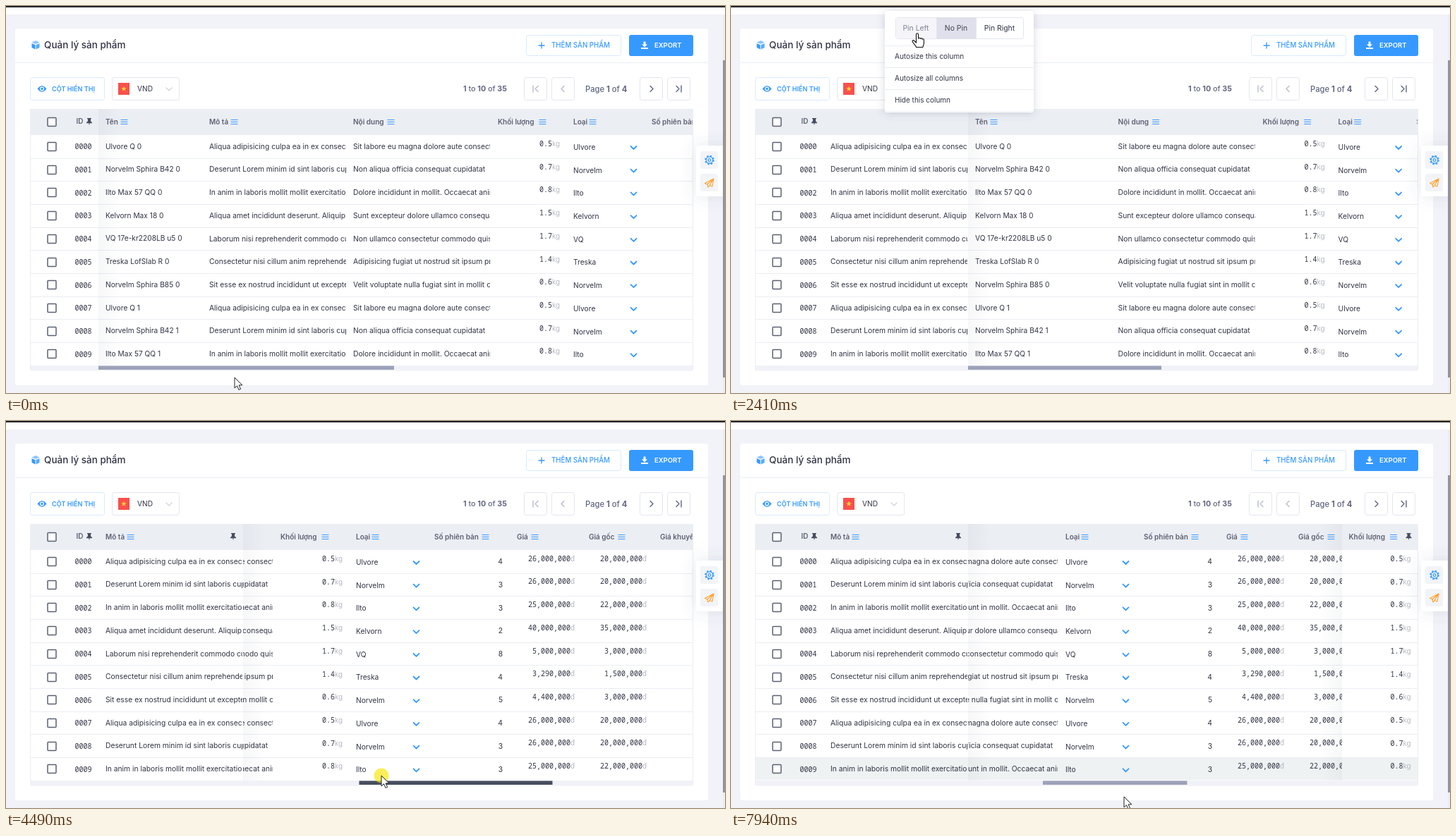
Animation of 1019x549 px, one loop 8000 ms. Source, as an HTML page:

```html
<!DOCTYPE html>
<html lang="vi">
<head>
<meta charset="utf-8">
<title>Quản lý sản phẩm</title>
<style>
html, body { margin: 0; width: 100%; height: 100%; overflow: hidden; background: #f2f3f8; }
svg { display: block; width: 100%; height: 100%; font-family: Inter, "Open Sans", sans-serif; }
text { fill: #303344; white-space: pre; }
.mono { font-family: "Noto Sans Mono", "DejaVu Sans Mono", monospace; font-size: 10px; }
.unit { fill: #a5a8b5; font-weight: 300; }
.line { fill: none; stroke-linecap: round; stroke-linejoin: round; }
</style>
</head>
<body>
<svg id="stage" viewBox="0 0 1019 549"></svg>
<script>
const LOOP = 8000, BLUE = '#3699ff', TOP = 199, PITCH = 32.7;
const stage = document.getElementById('stage');

// markup helpers
const text = (x, y, str, size = 10.3, attrs = '') =>
  `<text x="${x}" y="${y + size * .36}" font-size="${size}" ${attrs}>${str}</text>`;
const box = (x, y, w, h, fill = '#fff', attrs = '') =>
  `<rect x="${x}" y="${y}" width="${w}" height="${h}" fill="${fill}" ${attrs}/>`;
const line = (d, color, width = 1.4, attrs = '') =>
  `<path class="line" d="${d}" stroke="${color}" stroke-width="${width}" ${attrs}/>`;
const frame = (x, y, w, h, color = '#e4e6ef') =>
  box(x + .5, y + .5, w - 1, h - 1, '#fff', `rx="3" stroke="${color}"`);
const rows = fn => Array.from({ length: 10 }, (_, i) => fn(items[i % 7], TOP + PITCH * i, i)).join('');

// table data
const item = (brand, model, weight, versions, price, base, about, content) =>
  ({ brand, model, weight, versions, price, base, about, content });
const items = [
  item('Ulvore', 'Q', '0.5', 4, 26e6, 20e6,
    'Aliqua adipisicing culpa ea in ex consectetur', 'Sit labore eu magna dolore aute consectetur'),
  item('Norvelm', 'Sphira B42', '0.7', 3, 26e6, 20e6,
    'Deserunt Lorem minim id sint laboris cupidatat', 'Non aliqua officia consequat cupidatat'),
  item('Ilto', 'Max 57 QQ', '0.8', 3, 25e6, 22e6,
    'In anim in laboris mollit mollit exercitation', 'Dolore incididunt in mollit. Occaecat anim'),
  item('Kelvorn', 'Max 18', '1.5', 2, 40e6, 35e6,
    'Aliqua amet incididunt deserunt. Aliquip amet', 'Sunt excepteur dolore ullamco consequat'),
  item('VQ', '17e-kr2208LB u5', '1.7', 8, 5e6, 3e6,
    'Laborum nisi reprehenderit commodo culpa', 'Non ullamco consectetur commodo quis'),
  item('Treska', 'LofSlab R', '1.4', 4, 3.29e6, 1.5e6,
    'Consectetur nisi cillum anim reprehenderit', 'Adipisicing fugiat ut nostrud sit ipsum pro'),
  item('Norvelm', 'Sphira B85', '0.6', 5, 4.4e6, 3e6,
    'Sit esse ex nostrud incididunt ut excepteur', 'Velit voluptate nulla fugiat sint in mollit culpa')
];

const amount = (x, y, value, unit) =>
  `<text x="${x}" y="${y}" text-anchor="end"><tspan class="mono">${value}</tspan>` +
  `<tspan class="unit" font-size="10">${unit}</tspan></text>`;
const money = (x, key) => (r, y) => amount(x, y - .3, r[key].toLocaleString('en-US'), 'đ');
const chevron = (x, y, color, w = 1.8) => line(`M${x - 4} ${y - 2}l4 4 4-4`, color, w);
const pin = x => `<path d="M${x - 3} 159h6v1.2h-1v3l2 2v1h-3.3l-.7 3-.7-3h-3.3v-1l2-2v-3h-1z" fill="#464e5f"/>`;
const clipped = key => (r, y) => text(0, y, r[key], 10.3, 'clip-path="url(#cell)"');

// x of the label, label, offset of the menu icon, cell markup
const columns = {
  name: [141, 'Tên', 22, (r, y, i) => text(0, y, `${r.brand} ${r.model} ${i / 7 | 0}`, 10.2)],
  about: [288, 'Mô tả', 31, clipped('about')],
  content: [492, 'Nội dung', 49, clipped('content')],
  weight: [697, 'Khối lượng', 59, (r, y) => amount(88, y, r.weight, 'kg')],
  type: [804, 'Loại', 23, (r, y) => text(0, y + 1.3, r.brand, 10.2) + chevron(85.5, y + 2, BLUE)],
  versions: [915, 'Số phiên bản', 68, (r, y) => text(97, y + .5, r.versions, 10.3, 'text-anchor="end"')],
  price: [1032, 'Giá', 21, money(82, 'price')],
  base: [1134, 'Giá gốc', 42, money(82, 'base')],
  promo: [1235, 'Giá khuyến mãi', 82, () => '']
};
const column = ([id, [, label, icon, cell]]) => `<g id="${id}"><g class="head">
  ${text(0, 164, label, 10, 'font-weight="600" style="fill:#5d6173"')}
  ${line(`M${icon} 161.5h9m-9 3h9m-9 3h9`, BLUE, 1.2)}</g>${rows(cell)}</g>`;

const menu = (id, x, y, tip, units) => {
  const d = units ? 49 : 0, gy = y + (units ? 10 : 9), h = 144 + d;
  const label = (cx, cy, str, name = '') => text(cx, cy, str, 10.4, `text-anchor="middle" class="${name}"`);
  const rule = (x, y, h) => box(x, y, 1, h, '#e4e6ef');
  return `<g id="${id}"><g filter="url(#shadow)">${box(x, y, 211, h, '#fff', 'rx="3"')}
    <path d="M${tip} ${units ? y - 5 : y + h + 5}l-5 5h10z" fill="#fff"
      ${units ? '' : `transform="rotate(180 ${tip} ${y + h + 2.5})"`}/></g>
    ${frame(x + 15, gy, 182, 31)}
    ${box(x + 16, gy + 1, 57, 29, '#fff', 'class="left"')}${box(x + 73, gy, 56, 31, '#ebecf4', 'class="none"')}
    ${rule(x + 73, gy, 31)}${rule(x + 129, gy, 31)}
    ${label(x + 44, gy + 15.5, 'Pin Left', 'leftText')}${label(x + 101, gy + 15.5, 'No Pin', 'noneText')}
    ${label(x + 162.5, gy + 15.5, 'Pin Right')}
    ${units ? frame(x + 15, y + 59, 182, 31) + box(x + 15, y + 59, 92, 31, '#ebecf4') + rule(x + 107, y + 59, 31) +
      label(x + 61, y + 74.5, 'Kg', 'noneText') + label(x + 152, y + 74.5, 'Lb') : ''}
    ${['Autosize this column', 'Autosize all columns', 'Hide this column'].map((str, i) =>
      box(x, y + d + 49 + 31 * i, 211, 1, '#ebedf3') + text(x + 14, y + d + 64.5 + 31 * i, str, 10)).join('')}
    ${units ? '' : box(x, y + 142, 211, 1, '#f0f1f6')}</g>`;
};

const checkbox = y => box(59, Math.round(y) - 5.5, 12, 12, '#fff', 'rx="1" stroke="#5b6172" stroke-width="1.5"');
const pager = (x, d, color) => frame(x, 101, 33, 33) + line(d, color);
const bold = n => `<tspan font-weight="700">${n}</tspan>`;

stage.innerHTML = `
<defs>
  <clipPath id="cell"><rect y="140" width="194" height="400"/></clipPath>
  <clipPath id="mid"><rect id="midRect" y="146" height="364"/></clipPath>
  <linearGradient id="edge"><stop stop-color="#5a6478" stop-opacity=".05"/><stop offset="1" stop-color="#5a6478" stop-opacity="0"/></linearGradient>
  <filter id="shadow" x="-20%" y="-20%" width="140%" height="140%">
    <feDropShadow dx="0" dy="1" stdDeviation="6" flood-color="#525d79" flood-opacity=".25"/></filter>
  <filter id="soft" x="-100%" y="-60%" width="300%" height="220%">
    <feDropShadow dx="0" dy="0" stdDeviation="11" flood-color="#525d79" flood-opacity=".14"/></filter>
</defs>
${box(0, 0, 1019, 549, '#f2f3f8')}${box(0, 2, 1019, 10)}${box(0, 0, 1019, 2, '#222328')}
${box(13, 32, 982, 506, '#fff', 'rx="3"')}${box(13, 80, 982, 1, '#ebedf3')}
<path d="M36.5 51.5l5.5-2.500 5.500 2.500-5.500 2.500z" fill="#8cc4ff"/>
<path d="M36.500 53l5 2.300v6.200l-5-2.500z" fill="${BLUE}"/><path d="M47.500 53l-5 2.300v6.200l5-2.500z" fill="#59aaff"/>
${text(54, 55, 'Quản lý sản phẩm', 13.5, 'font-weight="500"')}
${frame(737, 41, 135, 30, '#d9eaff')}${line('M755 56h8m-4-4v8', BLUE, 1.3)}
${text(773, 56, 'THÊM SẢN PHẨM', 9.7, `font-weight="500" style="fill:${BLUE}"`)}
${box(883, 41, 91, 30, BLUE, 'rx="3"')}
<path d="M903.500 50.500h3v4h2.500l-4 4-4-4h2.500zM900 59h10v2h-10z" fill="#fff"/>
${text(919, 56, 'EXPORT', 9.5, 'font-weight="600" style="fill:#fff"')}
${frame(34, 101, 106, 33, '#d9eaff')}
<path d="M44.500 117.500q6.500-8.500 13 0q-6.500 8.500-13 0z" fill="${BLUE}"/><circle cx="51" cy="117.500" r="2.400" fill="${BLUE}" stroke="#fff" stroke-width="1.200"/>
${text(65, 117.5, 'CỘT HIỂN THỊ', 9.1, `font-weight="600" style="fill:${BLUE}"`)}
${frame(150, 101, 96, 33)}${box(159, 109, 16, 17, '#f9504b')}
<path d="M167 113.500l1 2.700h2.800l-2.200 1.700.8 2.800-2.400-1.700-2.400 1.700.8-2.800-2.200-1.700h2.800z" fill="#ffd23c"/>
${text(186, 117.5, 'VND', 10.2)}${chevron(231, 118, '#d1d3df', 1.2)}
${text(648, 117.5, `${bold(1)} to ${bold(10)} of ${bold(35)}`, 10.7, 'font-weight="500" style="fill:#5f6580"')}
${pager(734, 'M747 113v9m7-8.500l-4 4 4 4', '#b9bccb')}${pager(773, 'M791 113.500l-4 4 4 4', '#b9bccb')}
${text(821, 117.5, `Page ${bold(1)} of ${bold(4)}`, 11.2, 'font-weight="500" style="fill:#5f6580"')}
${pager(898, 'M913 113.500l4 4-4 4', '#5f6580')}${pager(937, 'M950 113.500l4 4-4 4m7-8.500v9', '#5f6580')}
${box(34.5, 146.5, 939, 370.5, '#fff', 'rx="2" stroke="#ebedf3"')}
${box(34, 146, 940, 37, '#ebeef3')}
<g id="hover">${box(35, 0, 938, 32, '#eff2f2')}</g>
${rows((r, y) => box(35, Math.round(y + 16.5), 938, 1, '#ebedf3'))}
${box(35, 510, 938, 6.5, '#f1f2f8')}
${checkbox(164)}${text(99.5, 163.5, 'ID', 10, 'font-weight="600" style="fill:#5d6173"')}${pin(118)}
${rows((r, y, i) => checkbox(y) + `<text class="mono" x="97.500" y="${y + 4.300}">000${i}</text>`)}
<circle id="glow" cy="164" r="8.500" fill="#cfe3f7"/>
<g id="pane" clip-path="url(#mid)">${Object.entries(columns).map(column).join('')}</g>
<g id="pinned"></g>
<g id="pinLeft">${pin(322)}</g><g id="pinRight">${pin(960.5)}</g>
<g id="edgeL">${box(0, 146, 32, 364, 'url(#edge)')}</g>
<g id="edgeR"><g transform="scale(-1 1)">${box(0, 146, 32, 364, 'url(#edge)')}</g></g>
<rect id="thumb" y="510.500" height="5.500"/>
<g filter="url(#soft)">${box(978, 198, 50, 72, '#fff', 'rx="3"')}</g>
${box(984, 206, 25, 25, '#f2f4f8', 'rx="3"')}${box(984, 238, 25, 25, '#f2f4f8', 'rx="3"')}
<circle cx="997" cy="218.500" r="5.800" fill="none" stroke="${BLUE}" stroke-width="2" stroke-dasharray="2.300 2.255"/>
<circle cx="997" cy="218.500" r="4.700" fill="#f2f4f8" stroke="${BLUE}" stroke-width="1.200"/><circle cx="997" cy="218.500" r="1.900" fill="none" stroke="${BLUE}" stroke-width="1.200"/>
${line('M1003 245l-12.500 6.500 3.500 1.500 1 4 2.200-2.600 3.800 1.600zm0 0l-9 8m9-8l-5.800 9.400', '#ffa12b', 1.1)}
${box(1016, 12, 3, 537, '#eceef3')}${box(1016, 77, 3, 450, '#9094a3')}
${menu('menu1', 218, 7, 323, false)}${menu('menu2', 432, 171, 537, true)}
<g id="cursor"><circle id="press" r="10.500" fill="#f7e600" fill-opacity=".65"/>
  <path id="arrow" d="M0 0v15l3.500-3.200 2.500 5.700 2.600-1.100-2.500-5.500h4.700z" fill="#fff" stroke-width="1"/>
  <path id="hand" d="M-1.500 1.200c0-2 3-2 3 0v6c.4-1.300 2.700-1.200 2.900.2 .6-1 2.600-.7 2.700.7 .8-.8 2.300-.3 2.300 1.100v4.300c0 3-1.500 3.700-1.500 6H-1.500c0-2-4-5-5.300-8 -.8-1.900 1.500-2.500 2.700-1l2.600 2.700z" fill="#fff" stroke="#111" stroke-width="1.100" stroke-linejoin="round"/></g>`;

const el = {};
stage.querySelectorAll('[id]').forEach(n => el[n.id] = n);
const set = (n, attrs) => Object.entries(attrs).forEach(([k, v]) => n.setAttribute(k, v));
const show = (n, on) => n.setAttribute('opacity', +on);
const shift = (n, x, y = 0) => n.setAttribute('transform', `translate(${x} ${y})`);

// timing helpers
const clamp = v => Math.min(1, Math.max(0, v));
const smooth = p => p * p * (3 - 2 * p);
const ease = p => 1 - (1 - clamp(p)) ** 2.5;
const between = (t, a, b) => t >= a && t < b;
const fade = (t, a, b) => clamp((t - a) / 120) * clamp((b - t) / 120);
const track = (keys, t, i, curve = p => p) => {
  const n = keys.findIndex(k => k[0] > t);
  if (n < 1) return keys[n ? keys.length - 1 : 0][i];
  const a = keys[n - 1], b = keys[n];
  return a[i] + (b[i] - a[i]) * curve((t - a[0]) / (b[0] - a[0]));
};

// bursts of picture changes: first, last, count
const bursts = [[380, 1170, 11], [1320, 2100, 11], [2180, 2950, 11], [3020, 3020, 1], [3260, 4030, 11],
  [4100, 4900, 11], [4970, 5510, 8], [5760, 6550, 11], [6630, 7400, 11], [7480, 7940, 7]];
const snap = t => {
  const burst = bursts.findLast(b => t >= b[0]);
  if (!burst) return 0;
  const [a, b, n] = burst, step = (b - a) / (n - 1 || 1) || 1;
  return Math.min(t, a + step * Math.min(n - 1, Math.floor((t - a) / step + .2)));
};

const path = [[300, 324, 527], [1170, 323, 170], [1320, 323, 166], [1560, 322, 163], [1860, 256, 52],
  [2100, 264, 39], [2500, 264, 39], [2950, 377, 515], [3180, 377, 515], [3560, 426, 516], [4030, 494, 511],
  [4490, 532, 503], [4620, 534, 503], [4900, 490, 508], [5510, 538, 161], [6050, 538, 161], [6400, 557, 157],
  [6550, 557, 157], [6950, 595, 197], [7400, 595, 199], [7940, 557, 533]];
const scrolls = [[3180, 0], [3560, 92], [4030, 226], [4490, 308], [4620, 308], [4900, 223]];
const PIN_LEFT = 2250, PIN_RIGHT = 7050;

function render(time) {
  const t = snap(time);
  const left = t >= PIN_LEFT, right = t >= PIN_RIGHT;
  const L = left ? 336 : 131, R = right ? 866 : 973;
  const scroll = track(scrolls, t, 1);

  // columns slide into the gaps the pinned ones leave
  const late = left ? 205 * (1 - ease((t - PIN_LEFT) / 400)) : 0;
  const gap = right ? 107 * ease((t - PIN_RIGHT) / 400) : 0;
  const place = (id, pinned, x) => {
    const home = pinned ? el.pinned : el.pane;
    if (el[id].parentNode !== home) home.appendChild(el[id]);
    shift(el[id], x);
  };
  Object.entries(columns).forEach(([id, [x]], i) => {
    if (id === 'about' && left) place(id, true, 141);
    else if (id === 'weight' && right) place(id, true, 875.5);
    else place(id, false, x - scroll + (id === 'name' ? L - 131 : late) - (i > 3 ? gap : 0));
  });
  show(el.about.querySelector('.head'), !between(t, PIN_LEFT, 2540));
  show(el.pinLeft, t >= 2540);
  show(el.pinRight, right);
  set(el.midRect, { x: L, width: R - L });
  shift(el.edgeL, L);
  shift(el.edgeR, R);
  show(el.edgeR, right);

  const drag = between(t, 3000, 4950);
  set(el.thumb, {
    x: L + scroll * (right ? .475 : .534),
    width: right ? 204.5 : left ? 274 : 419,
    fill: drag ? '#464e5f' : '#9da2b8'
  });

  show(el.menu1, fade(t, 1430, 2640));
  show(el.menu2, fade(t, 5790, 7320));
  el.menu1.querySelector('.left').setAttribute('fill', left ? '#f5f5f9' : '#fff');
  el.menu1.querySelector('.none').setAttribute('fill', left ? '#e0e0ec' : '#ebecf4');
  const grey = on => on ? '#7e8299' : '#3f4254';
  el.menu1.querySelector('.leftText').style.fill = grey(left);
  el.menu1.querySelector('.noneText').style.fill = grey(!left);
  el.menu2.querySelectorAll('.noneText').forEach(n => n.style.fill = grey(true));

  // row hover trails the pointer a little
  const y = track(path, t - 120, 2, smooth);
  const row = Math.floor((y - TOP + 16) / PITCH);
  const open = between(t, 1430, 2540) || between(t, 5790, 7250);
  show(el.hover, !drag && !open && row >= 0 && row < 10 && t >= 380);
  shift(el.hover, 0, TOP - 16 + PITCH * row);

  const first = between(t, 1150, 1620), second = between(t, 5480, 7200);
  show(el.glow, first || second);
  set(el.glow, { cx: first ? 323 : 537.5 });

  shift(el.cursor, track(path, t, 1, smooth), track(path, t, 2, smooth));
  const hand = first || second || between(t, 1960, 2600) || between(t, 7200, 7420);
  show(el.hand, hand);
  show(el.arrow, !hand);
  set(el.arrow, { stroke: between(t, 1620, 1960) ? '#1f9a34' : '#222' });
  show(el.press, between(t, 3200, 4950));
}

function tick(now) {
  render(now % LOOP);
  requestAnimationFrame(tick);
}
render(0);
requestAnimationFrame(tick);
</script>
</body>
</html>
```
